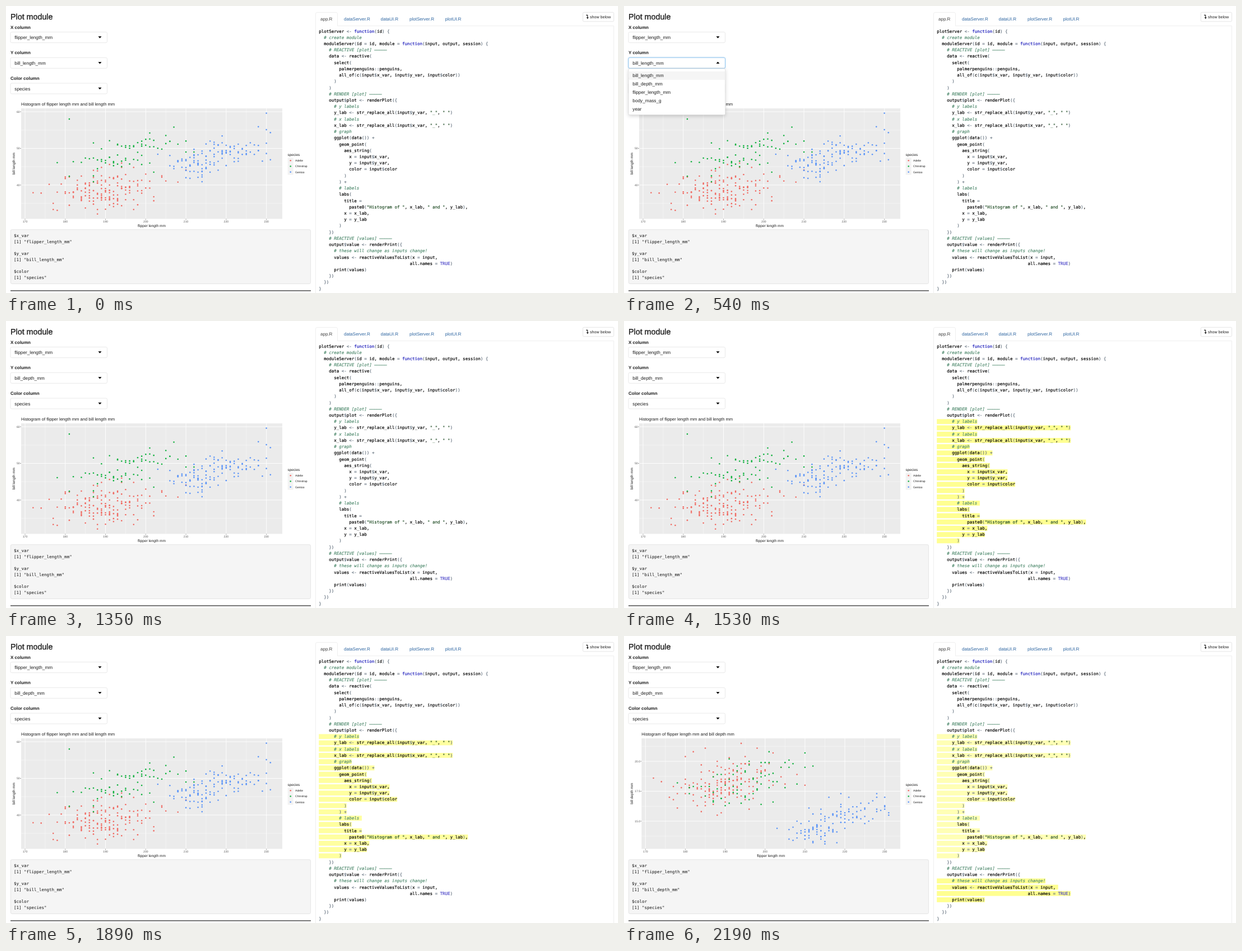
An HTML page that plays this animation: 1092x513 px, repeating every 2220 ms.

```html
<!DOCTYPE html>
<html lang="en">
<head>
<meta charset="utf-8">
<title>Plot module</title>
<style>
  html, body { margin: 0; width: 100%; height: 100%; overflow: hidden; background: #fff; }
  svg { display: block; width: 100vw; height: 100vh; }
  text { font-family: "Liberation Sans", Arial, sans-serif; fill: #1c1c1c; white-space: pre; text-rendering: geometricPrecision; }
  .mono { font: 7.49px "DejaVu Sans Mono", monospace; fill: #111; }
  .code { fill: #000; stroke: #000; stroke-width: .16px; }
  .comment { fill: #4c886b; stroke: #4c886b; font-style: italic; }
  .keyword { fill: #1414b8; stroke: #1414b8; }
  .literal { fill: #4a44c8; stroke: #4a44c8; }
  .string { fill: #1d4a22; stroke: #1d4a22; }
  .operator { fill: #5c6a78; stroke: #5c6a78; }
  #focus { filter: drop-shadow(0 0 1.5px rgba(102, 175, 233, .45)); }
  #menu > rect:first-child { filter: drop-shadow(0 2px 3px rgba(0, 0, 0, .18)); }
</style>
</head>
<body>
<svg id="stage" viewBox="0 0 1092 513" preserveAspectRatio="none"></svg>
<script>
const LOOP = 2220;
const CHAR = 4.51, CODE_X = 558.2, CODE_Y = 45, LINE = 11.22;
const COLORS = ['#f06a62', '#10b13e', '#5b94f7'];

const escape = s => s.replace(/&/g, '&amp;').replace(/</g, '&lt;');
const rect = (x, y, w, h, fill, extra = '') =>
  `<rect x="${x}" y="${y}" width="${w}" height="${h}" fill="${fill}" ${extra}/>`;
const text = (x, y, size, s, extra = '') =>
  `<text x="${x}" y="${y}" font-size="${size}" ${extra}>${escape(s)}</text>`;
const path = (d, stroke, width, extra = '') =>
  `<path d="${d}" fill="none" stroke="${stroke}" stroke-width="${width}" ${extra}/>`;
const dot = (x, y, color) => `<circle cx="${x.toFixed(2)}" cy="${y.toFixed(2)}" r="1.3" fill="${color}"/>`;
const group = (id, body) => `<g id="${id}">${body}</g>`;

// ---- penguin measurements: [flipper, bill length, bill depth] ----
let seed = 20;
const random = () => (seed = (seed * 16807) % 2147483647) / 2147483647;
const normal = u => (u ** 0.135 - (1 - u) ** 0.135) / 0.1975;
const clamp = (v, lo, hi) => Math.min(hi, Math.max(lo, v));

// Each species mixes a smaller female and a larger male cluster: [mean, spread] per measure.
const species = [
  {
    name: 'Adelie', count: 69,
    female: [[187.8, 5.2], [37.3, 1.9], [17.6, 0.9]],
    male: [[192.2, 5.6], [40.4, 2.1], [19, 1]],
    notable: [[172, 37.9, 18.6], [174, 37.8, 18.3], [176, 40.2, 17], [178, 33.1, 16.1], [188, 32.1, 15.5],
      [194, 46, 21.5], [202, 35.7, 18], [205, 41.1, 18.1], [208, 40.8, 18.9], [210, 44.1, 18],
      [198, 34.6, 21.1], [191, 45.6, 20.3], [180, 42.2, 18.5]]
  },
  {
    name: 'Chinstrap', count: 27,
    female: [[191.5, 4.6], [46.3, 0.9], [17.6, 0.7]],
    male: [[198.6, 4.6], [50.9, 1.1], [19.1, 0.7]],
    notable: [[181, 58, 17.8], [207, 55.8, 19.8], [178, 46.1, 18.2], [181, 42.4, 17.3], [202, 43.5, 16.6],
      [187, 40.9, 16.6], [187, 42.5, 16.7], [201, 54.2, 20.8], [210, 52, 20.7], [205, 53.5, 19.9],
      [210, 49, 19.5], [212, 49, 19.6], [199, 48.1, 16.4], [206, 51.9, 19.5], [187, 51.5, 18.7]]
  },
  {
    name: 'Gentoo', count: 55,
    female: [[212.7, 3.3], [45.6, 1.8], [14.2, 0.5]],
    male: [[221, 4.7], [49.3, 1.6], [15.7, 0.6]],
    notable: [[230, 59.6, 17], [203, 48.4, 14.4], [231, 54.3, 15.7], [228, 55.9, 17], [230, 55.1, 16],
      [219, 53.4, 17.3], [228, 50.8, 17.3], [214, 40.9, 13.7], [210, 42, 13.5], [207, 45.1, 14.5],
      [215, 46, 13.1], [230, 48.6, 16.2]]
  }
];

for (const s of species) {
  s.points = s.notable.slice();
  for (const [flipper, bill, depth] of [s.female, s.male]) {
    const sample = ([mean, sd], u = random()) => mean + sd * clamp(normal(u), -2.1, 2.1);
    for (let i = 0; i < s.count; i++) {
      const x = Math.round(sample(flipper, (i + 0.5) / s.count));
      s.points.push([x, sample(bill), Math.round(sample(depth) * 10) / 10]);
    }
  }
}

// ---- scatter plot ----
function plot(id, { left, x170, xUnit, y0, yBase, yUnit, ticks, minor, digits, label, column }) {
  const right = 493, top = 183, bottom = 380.5, mid = (left + right) / 2;
  const px = v => x170 + (v - 170) * xUnit;
  const py = v => yBase - (v - y0) * yUnit;
  const vLine = v => `M${px(v)} ${top}V${bottom}`;
  const hLine = v => `M${left} ${py(v)}H${right}`;
  const xs = [170, 180, 190, 200, 210, 220, 230];
  let out = text(left, 177.6, 7.6, `Histogram of flipper length mm and ${label}`);
  out += rect(left, top, right - left, bottom - top, '#ebebeb');
  out += path(xs.slice(0, 6).map(v => vLine(v + 5)).join('') + minor.map(hLine).join(''), '#fff', 0.4);
  out += path(xs.map(vLine).join('') + ticks.map(hLine).join(''), '#fff', 0.9);
  out += path(xs.map(v => `M${px(v)} ${bottom}v1.6`).join('') +
    ticks.map(v => `M${left} ${py(v)}h-1.6`).join(''), '#444', 0.6);
  for (const v of xs) out += text(px(v), 387, 5.07, String(v), 'text-anchor="middle" style="fill:#555"');
  for (const v of ticks)
    out += text(left - 2.3, py(v) + 1.9, 5.07, v.toFixed(digits), 'text-anchor="end" style="fill:#555"');
  out += text(mid, 394.6, 6.5, 'flipper length mm', 'text-anchor="middle"');
  out += text(0, 0, 6.4, label, 'text-anchor="middle" transform="translate(15.5 281.8) rotate(-90)"');
  species.forEach((s, i) => s.points.forEach(p => out += dot(px(p[0]), py(p[column]), COLORS[i])));
  return group(id, out);
}

// ---- inputs ----
const arrow = (y, up) => `<path d="M164.5 ${up ? y + 3.5 : y}h6l-3 ${up ? -3.5 : 3.5}z"/>`;
const selectBox = (y, label, body) =>
  text(8, y - 5.6, 8, label, 'font-weight="bold"') +
  rect(8, y + 0.3, 172.5, 19, '#fff', 'stroke="#e0e0e0" stroke-width=".7" rx="2.3"') + body;
const value = (y, s, id = '') => text(15.3, y + 12.9, 8.25, s, id && `id="${id}"`);

const options = ['bill_length_mm', 'bill_depth_mm', 'flipper_length_mm', 'body_mass_g', 'year'];
const menu = group('menu',
  rect(8.2, 112, 172.4, 82.5, '#fff', 'stroke="#d8d8d8" stroke-width=".6" rx="2"') +
  rect(8.5, 117, 171.8, 15, '#f5f5f5', 'id="hover"') +
  options.map((s, i) => text(15.3, 127.4 + 15 * i, 8.25, s)).join(''));

// ---- code panel; highlighted lines keep their trailing blanks ----
const code = `plotServer <- function(id) {
  # create module
  moduleServer(id = id, module = function(input, output, session) {
    # REACTIVE [plot] –––––
    data <- reactive(
      select(
        palmerpenguins::penguins,
        all_of(c(input$x_var, input$y_var, input$color))
      )
    )
    # RENDER [plot] –––––
    output$plot <- renderPlot({
      # y labels
      y_lab <- str_replace_all(input$y_var, "_", " ")
      # x labels
      x_lab <- str_replace_all(input$x_var, "_", " ")
      # graph
      ggplot(data()) +
        geom_point(
          aes_string(
            x = input$x_var,
            y = input$y_var,
            color = input$color
          )
        ) +
        # labels${' '}
        labs(
          title =
            paste0("Histogram of ", x_lab, " and ", y_lab),
          x = x_lab,
          y = y_lab
        )
    })
    # REACTIVE [values] –––––
    output$value <- renderPrint({
      # these will change as inputs change!
      values <- reactiveValuesToList(x = input,${' '}
                                    all.names = TRUE)
      print(values)
    })
  })
}`.split('\n');

const TOKEN = /(#.*)|("[^"]*")|\b(function)\b|\b(TRUE)\b|(<-|::|[=+$(){}])/g;
const KINDS = ['comment', 'string', 'keyword', 'literal', 'operator'];
const colorize = line => line.replace(TOKEN, (token, ...groups) =>
  `<tspan class="${KINDS[groups.findIndex(g => g !== undefined)]}">${escape(token)}</tspan>`);
const codeLine = (line, i) =>
  `<text class="mono code" x="${CODE_X}" y="${CODE_Y + 2.6 + i * LINE}">${colorize(line)}</text>`;
const marker = (id, from, to) => group(id, code.slice(from, to + 1).map((line, i) =>
  rect(CODE_X, CODE_Y - 4.3 + (from + i) * LINE, line.length * CHAR, 8.8, 'inherit')).join(''));

const tabs = [[603, 'dataServer.R'], [668.5, 'dataUI.R'], [720, 'plotServer.R'], [783.5, 'plotUI.R']];
const printed = [[0, '$x_var'], [1, '[1] "flipper_length_mm"'], [3, '$y_var'], [4, ''], [6, '$color'], [7, '[1] "species"']];

const stage = document.getElementById('stage');
stage.innerHTML =
  rect(0, 0, 1092, 513, '#fff') +
  text(8, 23.5, 14.3, 'Plot module', 'stroke="#1c1c1c" stroke-width=".35"') +
  plot('lengthPlot', {
    left: 27, x170: 34, xUnit: 7.177, y0: 40, yBase: 320, yUnit: 6.55,
    ticks: [40, 50, 60], minor: [35, 45, 55], digits: 0, label: 'bill length mm', column: 1
  }) +
  plot('depthPlot', {
    left: 31.3, x170: 38.3, xUnit: 7.115, y0: 15, yBase: 331, yUnit: 21.4,
    ticks: [15, 17.5, 20], minor: [13.75, 16.25, 18.75, 21.25], digits: 1, label: 'bill depth mm', column: 2
  }) +
  text(502.5, 267.8, 6.4, 'species') +
  species.map((s, i) => {
    const y = 276.3 + i * 10.2;
    return rect(502.7, y - 5, 10, 10, '#f2f2f2') + dot(507.7, y, COLORS[i]) + text(516, y + 1.9, 5.07, s.name);
  }).join('') +
  selectBox(46.3, 'X column', value(46.3, 'flipper_length_mm') + arrow(54.3)) +
  selectBox(137.7, 'Color column', value(137.7, 'species') + arrow(145.7)) +
  selectBox(92, 'Y column',
    rect(8, 92.3, 172.5, 19, '#fff', 'id="focus" stroke="#7dbbec" stroke-width=".8" rx="2.3"') +
    value(92, '', 'yValue') + group('closedArrow', arrow(100)) + group('openArrow', arrow(99.6, true)) +
    rect(70.2, 97.3, 0.8, 9.8, '#111', 'id="caret"')) +
  menu +
  rect(8.3, 399.7, 535.2, 96.8, '#f5f5f5', 'stroke="#dcdcdc" stroke-width=".7" rx="2.4"') +
  printed.map(([row, s]) =>
    `<text class="mono" x="14" y="${412.9 + row * 10.7}" ${s ? '' : 'id="yPrinted"'}>${s}</text>`).join('') +
  rect(8, 508.3, 536, 1.3, '#333') +
  path('M552.5 513V14q0-2.5 2.5-2.5H589q2.5 0 2.5 2.5V35.5H1084.5V513', '#e8e8e8', 0.7) +
  text(561, 26.2, 8, 'app.R', 'style="fill:#444"') +
  tabs.map(([x, s]) => text(x, 26.2, 8, s, 'style="fill:#2c64a0"')).join('') +
  rect(1029.3, 11.3, 55.2, 16.4, '#fff', 'stroke="#dadada" stroke-width=".7" rx="2"') +
  path('M1035 16.4H1037.7V21', '#222', 1.1) + '<path d="M1035.6 20.3h4.2l-2.1 3z" fill="#222"/>' +
  text(1042, 22, 7.1, 'show below') +
  marker('plotMark', 12, 31) + marker('printMark', 35, 38) +
  code.map(codeLine).join('');

// ---- timeline ----
const $ = id => document.getElementById(id);
const show = (id, on) => $(id).style.display = on ? '' : 'none';
const ramp = (t, from, to) => clamp((t - from) / (to - from), 0, 1);

function fadeMark(id, age) {
  show(id, age >= 0);
  const progress = 0.5 - Math.cos(Math.PI * clamp(age / 2000, 0, 1)) / 2;
  $(id).style.fill = `rgb(255, 255, ${Math.round(144 + 111 * progress)})`;
}

function render(t) {
  const open = t >= 60 && t < 1350, picked = t >= 1350, redrawn = t >= 2070;
  $('focus').style.opacity = picked ? 0 : ramp(t, 30, 120);
  show('menu', open);
  show('openArrow', open);
  show('closedArrow', !open);
  show('caret', open);
  $('caret').style.opacity = 1 - ramp(t, 390, 510) + ramp(t, 600, 660);
  $('hover').setAttribute('y', t < 870 ? 117 : 132);
  $('yValue').textContent = picked ? 'bill_depth_mm' : 'bill_length_mm';
  $('yPrinted').textContent = `[1] "${redrawn ? 'bill_depth_mm' : 'bill_length_mm'}"`;
  show('lengthPlot', !redrawn);
  show('depthPlot', redrawn);
  fadeMark('plotMark', t - 1410);
  fadeMark('printMark', t - 2070);
}

const start = performance.now();
function tick() {
  render((performance.now() - start) % LOOP);
  requestAnimationFrame(tick);
}
tick();
</script>
</body>
</html>
```
